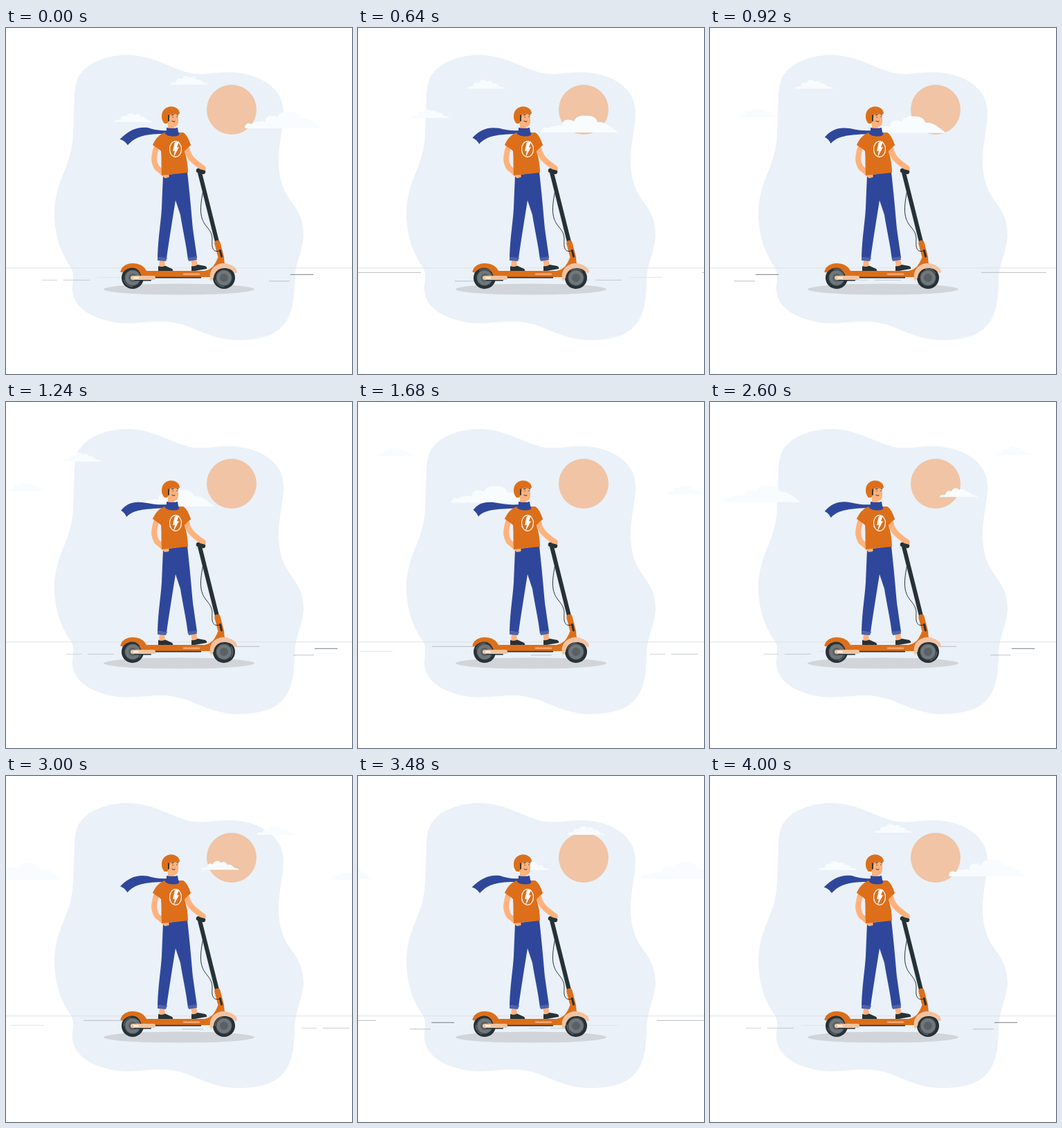
Write an HTML page that moves like this. It is 500x500 px and loops after 4.08 s.

```html
<!DOCTYPE html>
<html lang="en">
<head>
<meta charset="utf-8">
<title>Scooter ride</title>
<style>
  html, body { margin: 0; width: 100%; height: 100%; overflow: hidden; background: #fff; }
  svg { display: block; width: 100%; height: 100%; }
  .orange { fill: #dd6f1a; }
  .blue { fill: #2f479b; }
  .cuff { fill: #4c62ab; }
  .dark { fill: #263238; }
  .skin { fill: #ffb27d; }
  .peach { fill: #f2c3a0; }
  .cloud { fill: #f8fcff; }
  .line { fill: none; stroke-linecap: round; stroke-linejoin: round; }
</style>
</head>
<body>
<svg viewBox="0 0 500 500">
  <defs>
    <path id="big" d="M0-1C0-6 5-9 10-6C12-9 18-10 20-9C24-12 28-10 30-9C29-18 38-21 47-16C50-24 58-25 64-24C75-25 80-20 81-15C94-16 100-8 110-1Q111 0 109 0H2Z"/>
    <path id="small" d="M0 0C2-4 6-4 9-3C9-9 14-10 17-8C20-14 26-14 29-10C34-13 38-10 38-7C44-9 47-4 48-3Q54-2 56 0Z"/>
    <g id="wheel">
      <circle class="dark" r="16"/>
      <circle r="11.5" fill="#596166"/>
      <path class="line" d="M-12.6 3A13 13 0 0 0 0 13" stroke="#7d8588" stroke-width=".8"/>
      <circle r="10.5" fill="#6f777a"/>
      <circle r="6" fill="#596166"/>
    </g>
  </defs>

  <path fill="#eaf1f8" d="M176 39C212 39 240 60 270 66C295 68 305 63 330 64C375 68 401 92 401 122C401 145 394 165 394 193C395 255 430 250 430 300C428 325 418 338 417 365C416 415 408 451 335 451C285 450 270 424 222 424C195 425 185 428 160 426C125 420 93 404 96 372C98 358 98 352 92 343C80 325 69 300 70 262C73 215 96 200 97 150C100 95 96 78 111 62C125 47 150 39 176 39Z"/>
  <circle cx="326" cy="118" r="36" fill="#f0c4a4"/>
  <g id="clouds" class="cloud"></g>
  <path stroke="#dde1e5" d="M0 346.8H500"/>
  <ellipse cx="250" cy="377.5" rx="109" ry="8" fill="#d1d5d9"/>
  <g id="road"></g>

  <!-- rider -->
  <path id="tail" class="blue"/>
  <path class="skin" d="M222 334H229L230 346H221ZM267 334H275L277 345H269Z"/>
  <path class="dark" d="M220 344Q226 346 230 343.500L240 348Q242 350 241 351.500H220ZM268 344Q273 345 277 342L288 344Q291 346 290 348L270 351.500H268Z"/>
  <path class="blue" d="M227 213L262 208C265 235 267 255 270 290L276 332L263 335C260 310 255 290 252 270L245 249C240 280 236 305 232 333L219 331C220 300 224 280 225 260Z"/>
  <path class="cuff" d="M219 331L233 332L231 337L219 336ZM263 332L275 330L276 335L264 337Z"/>
  <path class="line" stroke="#ffb27d" stroke-width="8" d="M217 173C213 188 213 193 218 202L230 212"/>
  <path class="skin" d="M226 208L233 209Q237 213 235 216L229 217Z"/>
  <path class="orange" d="M230 151C220 154 215 162 212 169L222 176L224 178C225 190 224 202 225 213L263 209C263 198 261 188 258 178L267 169C264 160 261 154 256 151Z"/>
  <ellipse cx="245" cy="175" rx="8.500" ry="11.300" fill="none" stroke="#fff" stroke-width="1.200"/>
  <path fill="#fff" d="M244 165L250 164L247 172.500L250 172L242 187L244 177.500L241 178Z"/>

  <!-- scooter -->
  <g id="rear" transform="translate(183 361)"><use href="#wheel"/></g>
  <path class="orange" d="M166 350C171 336 197 337 203 351H287C297 349 302 343 306 332L315 332L316 342L296 360H196C193 344 178 343 169 353Q164 354 166 350Z"/>
  <path stroke="#263238" stroke-width="1.600" d="M209 360.600H282"/>
  <path class="line" stroke="#f2a772" stroke-width="2.400" d="M257 355.700H279"/>
  <path class="line" stroke="#263238" stroke-width="2" d="M186 364.500H209"/>
  <rect class="peach" x="180" y="358" width="36" height="6" rx="3"/>
  <path class="line" stroke="#fff" stroke-width="2" d="M185 361H191"/>
  <g id="front" transform="translate(315 361)"><use href="#wheel"/></g>
  <path class="peach" d="M296 366C291 350 302 341 313 340C325 340 333 346 334 352Q333 356 330 353C322 344 302 344 300 361Z"/>
  <path class="line" stroke="#263238" stroke-width="6" d="M280 209L305 309"/>
  <path class="line" stroke="#dd6f1a" stroke-width="8.500" d="M305.500 311L311 332"/>
  <path class="line" stroke="#263238" stroke-width="3" d="M309.500 321.500L311.500 330"/>
  <path class="line" stroke="#263238" d="M284.500 237C279 265 281 276 290 287C301 300 297 305 298 315C299 322 303 324 309 322"/>

  <path class="line" stroke="#ffb27d" stroke-width="8" d="M261.500 176C264 185 267 190 284 202"/>
  <path class="orange" d="M256 156L267 169L258 178L254 176Z"/>
  <path class="line" stroke="#263238" stroke-width="6.500" d="M278 206L285 208"/>
  <path class="skin" d="M277 196L287 199Q290 202 288 206L280 204Z"/>

  <!-- head -->
  <path class="skin" d="M234 122H249V136Q248 143 243 143L243 150H234Z"/>
  <path class="blue" d="M232 144Q240 146 248 144L249 150Q252 155 247 156Q236 158 230 153Q229 150 232 149Z"/>
  <path class="orange" d="M229 138C223 132 223 117 235 114C245 112 251 118 251 124L237 125C236 130 235 135 233 138Z"/>
  <path class="line" stroke="#263238" stroke-width="1.800" d="M235 126.500V134"/>
  <path class="line" stroke="#263238" d="M239.500 126L242 125.300M247 125L249 125.300M241 128.500V129M247 128V128.500M240 134.500Q242 136 244 135"/>
</svg>
<script>
const STEP = 40, TRAVEL = 4000, LOOP = 4080;
const mod = (v, n) => ((v % n) + n) % n;
const byId = id => document.getElementById(id);
const place = (el, x, y) => el.setAttribute('transform', `translate(${x} ${y})`);

// Vertical drift of the clouds: one smooth curve through heights at these phases.
const phases = [0, .16, .31, .55, .75, .87, 1];
const clouds = [
  { shape: 'big', x: 345, y: [145, 151, 151, 141, 150, 149, 145] },
  { shape: 'small', x: 237, y: [82, 87.5, 86, 71.5, 85, 85, 82] },
  { shape: 'small', x: 156.5, y: [136, 130, 129, 138, 135.5, 136, 136] }
];
// Road marks: x, y, length, colour
const marks = [
  [52, 364.3, 22, '#cfd5d9'], [83, 364.3, 38, '#c3cace'], [132, 360.3, 48, '#dfe5ea'],
  [237, 353.3, 94, '#b9bfc3'], [411, 356.3, 33, '#747d82'], [380, 365.8, 30, '#b7c2ca']
];

function curve(y, p) {
  const n = phases.length - 1;
  const i = Math.min(phases.findLastIndex(q => q <= p), n - 1);
  const slope = k => {
    const a = k % n ? k - 1 : n - 1, b = k % n ? k + 1 : 1;
    const span = k % n ? phases[b] - phases[a] : 1 - phases[a] + phases[b];
    return (y[b] - y[a]) / span;
  };
  const h = phases[i + 1] - phases[i], u = (p - phases[i]) / h, v = 1 - u;
  return v * v * (1 + 2 * u) * y[i] + u * u * (3 - 2 * u) * y[i + 1]
    + h * u * v * (v * slope(i) - u * slope(i + 1));
}

// Every travelling item has a twin one stage width to the left.
function addPair(parent, markup) {
  const g = document.createElementNS('http://www.w3.org/2000/svg', 'g');
  g.innerHTML = markup + `<g transform="translate(-500 0)">${markup}</g>`;
  return byId(parent).appendChild(g);
}
for (const c of clouds) c.el = addPair('clouds', `<use href="#${c.shape}"/>`);
const markEls = marks.map(([, , w, color]) => addPair('road', `<path stroke="${color}" d="M0 0H${w}"/>`));

function tailPath(w) {
  const mix = (up, down) => (up + (down - up) * (w + 1) / 2).toFixed(2);
  const tip = `${mix(166.5, 164.5)} ${mix(156, 161)}`;
  const end = `${mix(174, 176)} ${mix(165.5, 169.5)}`;
  return `M234 148C222 149 214 ${mix(148, 147)} ${mix(202, 205)} ${mix(146, 144)}`
    + `C${mix(185, 192)} ${mix(143, 142)} ${mix(175, 178)} ${mix(145, 147)} ${tip}`
    + `Q${mix(171, 172)} ${mix(159, 163)} ${end}`
    + `C${mix(184, 187)} ${mix(154, 157)} ${mix(205, 200)} ${mix(155, 152)} 234 153Z`;
}

function draw(now) {
  const t = Math.min(Math.floor(mod(now, LOOP) / STEP) * STEP, TRAVEL), p = t / TRAVEL;
  for (const c of clouds) place(c.el, mod(c.x - 500 * p, 500), curve(c.y, p));
  marks.forEach(([x, y], i) => place(markEls[i], mod(x - 1500 * p, 500), y));
  byId('tail').setAttribute('d', tailPath(Math.cos(2 * Math.PI * (p + .07))));
  byId('rear').setAttribute('transform', `translate(183 361) rotate(${5400 * p})`);
  byId('front').setAttribute('transform', `translate(315 361) rotate(${5400 * p})`);
}

const start = performance.now();
function tick() {
  draw(performance.now() - start);
  requestAnimationFrame(tick);
}
tick();
</script>
</body>
</html>
```
